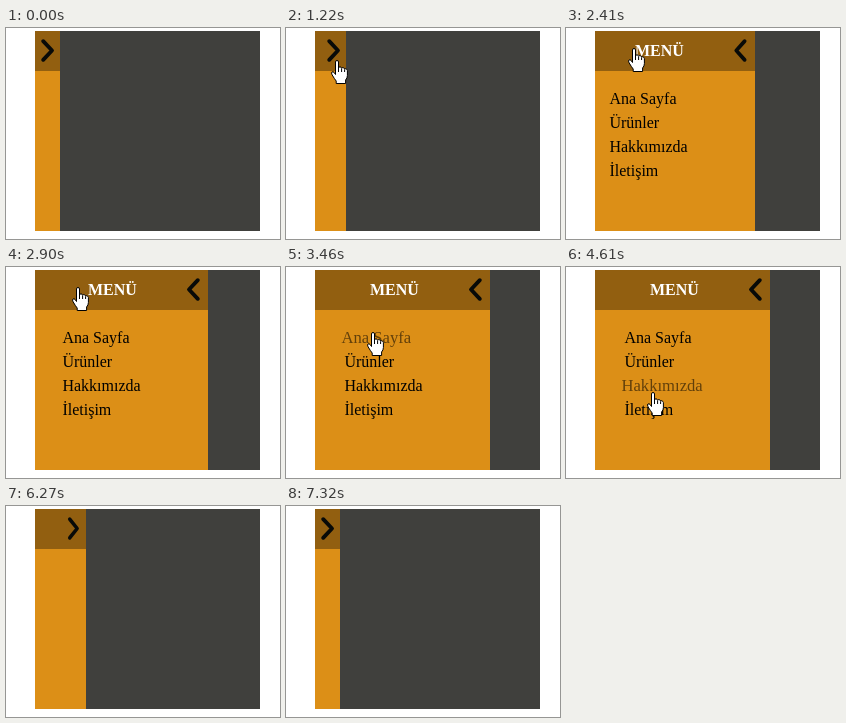
An HTML page that plays this animation: 274 px wide and 211 px high, repeating every 7.59 s.

```html
<!DOCTYPE html>
<html lang="tr">
<head>
<meta charset="utf-8">
<title>Menü</title>
<style>
  html, body { margin: 0; width: 100%; height: 100%; overflow: hidden; background: #fff; }
  svg { display: block; }
  text { font: 16px "Liberation Serif", "Times New Roman", serif; }
  .title { font-weight: bold; fill: #fff; }
  .cursor { fill: #fff; stroke: #000; stroke-linejoin: round; }
</style>
</head>
<body>
<svg width="274" height="211" viewBox="0 0 274 211">
  <clipPath id="box"><rect x="29" y="3" width="225" height="200"/></clipPath>
  <g clip-path="url(#box)">
    <rect x="29" y="3" width="225" height="200" fill="#40403d"/>
    <g id="panel">
      <rect x="29" y="3" width="175" height="200" fill="#dc8f17"/>
      <rect x="29" y="3" width="175" height="40" fill="#925f10"/>
      <text class="title" x="84" y="28">MENÜ</text>
      <g id="links"></g>
      <path id="chevron" d="M-3.3 -9.3L5.5 0L-3.3 9.3" fill="none" stroke="#080a08"
        stroke-width="3.9" stroke-linecap="round" stroke-linejoin="round"/>
    </g>
  </g>
  <path id="arrow" class="cursor" d="M.5 .5V16.5L4.2 13L6.8 18.8L9.2 17.8L6.7 12H11.6Z"/>
  <g id="hand" class="cursor">
    <path d="M-1.5 14.5V2Q-1.5 .5 0 .5T1.5 2V8Q1.8 6.8 3 6.8T4.6 8.3Q5 7.4 6.2 7.6T7.6 9.2Q8 8.5 9 8.8T10.4 10.6V15.5Q10.4 18 8.6 20V23.5H-.8V21Q-2.5 19 -4.9 14.8Q-6 12.8 -5 12T-3 12.4Z"/>
    <path d="M1.5 8V12M4.6 8.5V12M7.6 9.5V12" fill="none"/>
  </g>
</svg>
<script>
const LOOP = 7590, STEP = 70, SLIDE = 2100, OPEN = 1100, CLOSE = 5166;
const ROW_TOP = 59, ROW = 24;

// Spans in which the picture is refreshed every STEP ms
const spans = [[590, 3460], [3720, 3930], [4200, 4340], [4610, 4750], [5080, 7320]];

// Pointer tip: time, x, y
const path = [
  [590, 203, 199], [1130, 50, 34], [1780, 60, 20], [2410, 68, 20], [2900, 72, 20],
  [3460, 87, 65], [3650, 87, 65], [3930, 87, 93], [4130, 87, 93], [4340, 87, 119],
  [4540, 87, 119], [4750, 87, 136], [5010, 87, 136], [5290, 92, 212]
];

const $ = id => document.getElementById(id);
const [panel, list, chevron, arrow, hand] =
  ['panel', 'links', 'chevron', 'arrow', 'hand'].map($);

const links = ['Ana Sayfa', 'Ürünler', 'Hakkımızda', 'İletişim'].map((label, i) => {
  const el = document.createElementNS('http://www.w3.org/2000/svg', 'text');
  el.textContent = label;
  el.setAttribute('x', 58.4);
  el.setAttribute('y', 76 + ROW * i);
  return list.appendChild(el);
});

const move = (el, x, y, extra = '') =>
  el.setAttribute('transform', `translate(${x} ${y}) ${extra}`);

// cubic-bezier(.25, .1, .25, 1)
function ease(x) {
  if (x <= 0) return 0;
  if (x >= 1) return 1;
  const curve = (u, a, b) => 3 * u * (1 - u) * ((1 - u) * a + u * b) + u ** 3;
  let lo = 0, hi = 1;
  for (let i = 0; i < 24; i++) {
    const mid = (lo + hi) / 2;
    if (curve(mid, .25, .25) < x) lo = mid; else hi = mid;
  }
  return curve(lo, .1, 1);
}

function snap(t) {
  let time = 0;
  for (const [from, to] of spans)
    if (t >= from) time = Math.min(to, from + Math.floor((t - from) / STEP) * STEP);
  return time;
}

function pointer(t) {
  const i = path.findIndex(p => p[0] > t);
  if (i < 1) return null;
  const [a, b] = [path[i - 1], path[i]];
  const k = (t - a[0]) / (b[0] - a[0]);
  return { x: a[1] + (b[1] - a[1]) * k, y: a[2] + (b[2] - a[2]) * k };
}

function draw(t) {
  const open = ease((t - OPEN) / SLIDE) - ease((t - CLOSE) / SLIDE);
  const shift = Math.round(150 * (open - 1));
  move(panel, shift, 0);
  move(chevron, 190.5, 22.5, `scale(${Math.cos(Math.PI * open)} 1)`);

  const tip = pointer(t);
  const inside = tip && tip.x < 204 + shift && tip.y < 203;
  const row = inside ? Math.floor((tip.y - ROW_TOP) / ROW) : -1;
  links.forEach((el, i) => {
    const on = i === row, cy = ROW_TOP + ROW * (i + .5);
    el.setAttribute('opacity', on ? .55 : 1);
    if (on) move(el, 131.5, cy, `scale(1.04) translate(-131.5 ${-cy})`);
    else el.removeAttribute('transform');
  });

  arrow.style.display = tip && !inside ? '' : 'none';
  hand.style.display = inside ? '' : 'none';
  if (tip) move(inside ? hand : arrow, Math.round(tip.x), Math.round(tip.y));
}

const start = performance.now();
function tick() {
  draw(snap((performance.now() - start) % LOOP));
  requestAnimationFrame(tick);
}
tick();
</script>
</body>
</html>
```
